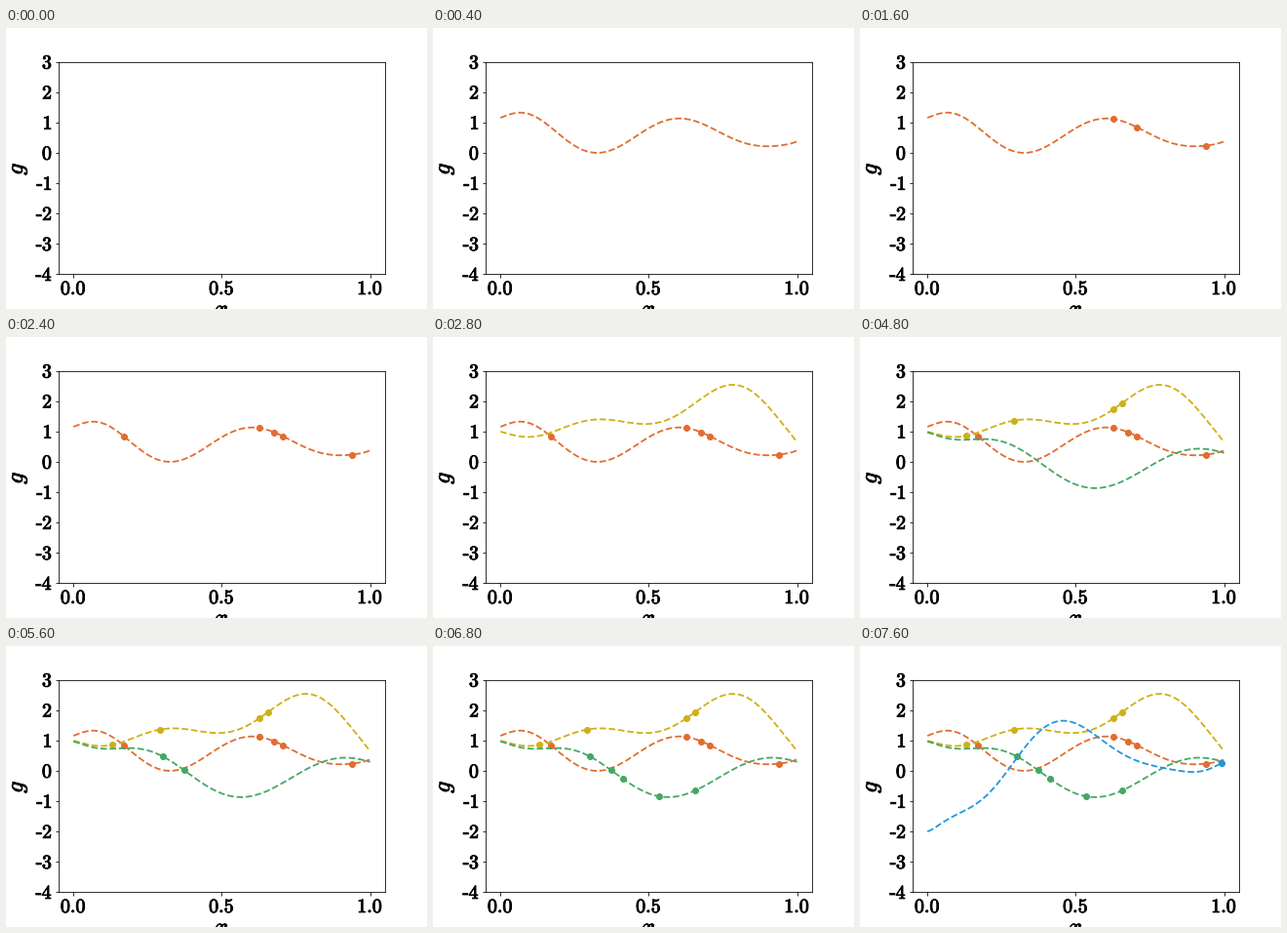
These frames come from a looping animation (432 by 288 pixels, 8 s). A matplotlib script:

```python
import numpy as np
import matplotlib.pyplot as plt
from matplotlib import patheffects
from matplotlib.animation import FuncAnimation
from numpy.polynomial import Chebyshev

plt.rcParams.update({
    "mathtext.fontset": "cm",
    "font.family": "Liberation Serif",
    "toolbar": "None",
})

WIDTH, HEIGHT, DPI = 432, 288, 72
STEP_MS = 400
GRID = np.linspace(0, 1, 100)

# Each function: colour, heights at the key points, sampled grid indices in order
FUNCTIONS = [
    ("#e16d31", [1.15, 1.26, 1.19, .23, .27, 1.12, .62, .215, .28, .37],
     [62, 70, 93, 17, 67]),
    ("#cfb017", [.99, .91, .83, 1.25, 1.32, 1.49, 2.48, 2.02, 1.02, .64],
     [62, 13, 29, 65]),
    ("#44a865", [.96, .87, .72, .67, -.27, -.86, -.15, .40, .365, .29],
     [30, 37, 65, 53, 41]),
    ("#1f97de", [-2.01, -1.85, -1.36, -.26, 1.54, 1.02, .19, -.04, .14, .30],
     [98]),
]


def smooth_curve(heights):
    """Polynomial through key points that crowd towards both ends of [0, 1]."""
    degree = len(heights) - 1
    key_x = (1 - np.cos(np.pi * np.arange(degree + 1) / degree)) / 2
    return Chebyshev.fit(key_x, heights, degree, domain=[0, 1])


def embolden(text):
    text.set_path_effects([patheffects.withStroke(linewidth=0.9, foreground="black")])


def tick_text(value):
    return f"-${-value}$" if value < 0 else f"${value}$"


def label(x, y, text, **style):
    """Place a figure label at pixel x, y measured from the top left."""
    return fig.text(x / WIDTH, 1 - y / HEIGHT, text, size=24, ha="center", **style)


fig = plt.figure(figsize=(WIDTH / DPI, HEIGHT / DPI), dpi=DPI, facecolor="white")
ax = fig.add_axes([0.125, 0.125, 0.775, 0.755])
ax.set(xlim=(-0.05, 1.05), ylim=(-4, 3))
x_ticks, y_ticks = [0.0, 0.5, 1.0], range(-4, 4)
ax.set_xticks(x_ticks, [tick_text(v) for v in x_ticks])
ax.set_yticks(y_ticks, [tick_text(v) for v in y_ticks])
ax.tick_params(labelsize=20)
ax.tick_params(axis="y", pad=2.5)

# The x label is mostly cut off by the lower edge of the figure
labels = [label(221.4, 295.5, "$x$", va="baseline"),
          label(13.5, 144, "$g$", va="center", rotation=90)]
for text in [*labels, *ax.get_xticklabels(), *ax.get_yticklabels()]:
    embolden(text)

artists = []
for color, heights, samples in FUNCTIONS:
    curve = smooth_curve(heights)
    artists += ax.plot(GRID, curve(GRID), "--", color=color, lw=1.8)
    for x in GRID[samples]:
        artists += ax.plot([x], [curve(x)], "o", color=color, ms=6)


def update(frame):
    for order, artist in enumerate(artists):
        artist.set_visible(order < frame)
    return artists


anim = FuncAnimation(fig, update, frames=len(artists) + 1, interval=STEP_MS,
                     repeat=True, repeat_delay=0, blit=False)
plt.show()
```
